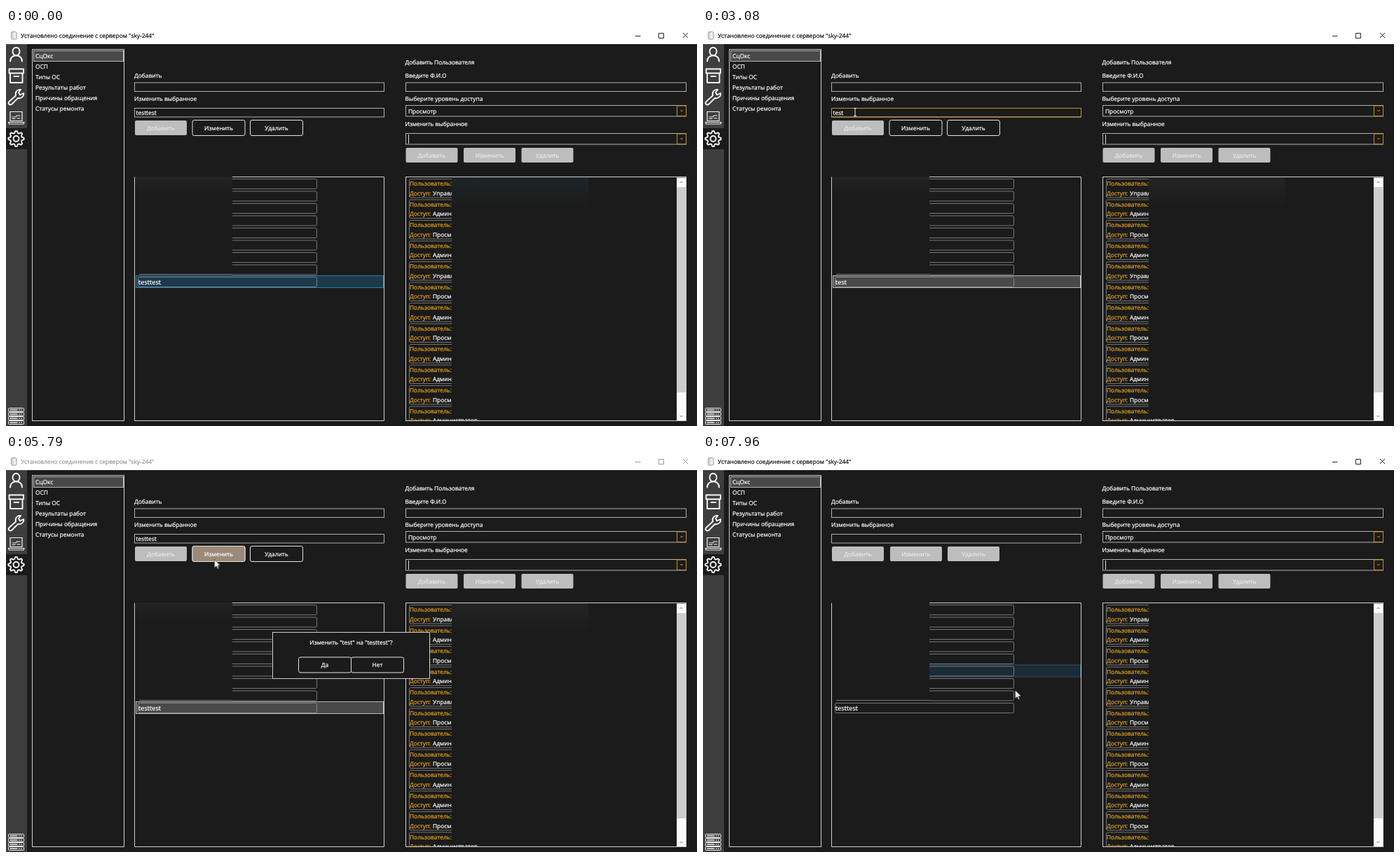
Recreate the animation shown at these times as an HTML page. Size 986 px wide and 568 px high, loop 8000 ms.

```html
<!DOCTYPE html>
<html lang="ru">
<head>
<meta charset="utf-8">
<title>Настройки</title>
<style>
html, body { margin: 0; width: 100%; height: 100%; overflow: hidden; background: #1b1b1b; }
svg { display: block; width: 986px; height: 568px; }
text { font: 8.4px "Open Sans", "Noto Sans", sans-serif; fill: #fff; stroke: #fff; stroke-width: .22; text-rendering: geometricPrecision; white-space: pre; }
.dark { fill: #111; stroke: #111; }
.faded { fill: #999; stroke: #999; }
.gold { fill: #e3a01e; stroke: #e3a01e; }
.big { font-size: 9.2px; }
.off { fill: #e8e8e8; stroke: #e8e8e8; }
.mid { text-anchor: middle; }
.icon { fill: none; stroke: #f8f8f8; stroke-width: 1.9; stroke-linejoin: round; stroke-linecap: round; }
.icon .thin { stroke-width: 1.2; }
</style>
</head>
<body>
<script>
const LOOP = 8000, BG = '#1b1b1b', LINE = '#cfcfcf', INPUT = '#b0b0b0', GOLD = '#c8901e';
// Moments of the story, in ms
const START = 40, PICK = 1300, FOCUS = 2450, ASK = 5600, CLOSE = 7400;
let css = '', count = 0;

const animate = (frames, ease) => {
  const id = 'k' + count++;
  css += `@keyframes ${id}{${frames.map(([t, s]) => `${t / LOOP * 100}%{${s}}`).join('')}}`;
  return `style="animation:${id} ${LOOP}ms ${ease} infinite"`;
};
const during = (from, to, body) => {
  const frames = [[0, `opacity:${from ? 0 : 1}`]];
  if (from) frames.push([from, 'opacity:1']);
  frames.push([to, `opacity:${to < LOOP ? 0 : 1}`]);
  if (to < LOOP) frames.push([LOOP, 'opacity:0']);
  return `<g ${animate(frames, 'step-end')}>${body}</g>`;
};
const fade = (points, body) =>
  `<g ${animate(points.map(([t, o]) => [t, `opacity:${o}`]), 'linear')}>${body}</g>`;

const rect = (x, y, x2, y2, fill = 'none', stroke = 'none', r = 0) =>
  `<rect x="${x}" y="${y}" width="${x2 - x}" height="${y2 - y}" rx="${r}" fill="${fill}" stroke="${stroke}"/>`;
const path = (d, stroke, width = 1, fill = 'none') =>
  `<path d="${d}" stroke="${stroke}" stroke-width="${width}" fill="${fill}"/>`;
// y is the middle of the capitals
const text = (x, y, s, cls = '') => `<text x="${x}" y="${y + 3}" class="${cls}">${s}</text>`;
const button = (x, y, label, fill = BG) =>
  rect(x, y, x + 75, y + 22, fill, '#e4e4e4', 2.5) + text(x + 37.5, y + 11.3, label, 'mid');
const disabled = (x, y, label) =>
  rect(x, y, x + 74, y + 21, '#bdbdbd', 'none', 2) + text(x + 37, y + 11, label, 'mid off');
const chevron = (x, y, dir, color) => path(`M${x - 2} ${y - dir}l2 ${2 * dir} 2 ${-2 * dir}`, color);

function titleBar() {
  const controls = (color, cls) =>
    text(21, 10.8, 'Установлено соединение с сервером "sky-244"', cls) +
    path('M898 11.5h7.5M931.5 7.5h7v7h-7zM966 7l7 7M973 7l-7 7', color);
  return rect(0, 0, 986, 23, '#fff') +
    rect(7.5, 5.5, 15, 16, '#eee', '#999', 1.5) + path('M9.5 6v10', '#bbb') +
    during(0, ASK, controls('#222', 'dark')) +
    during(ASK, CLOSE, controls('#999', 'faded')) +
    during(CLOSE, LOOP, controls('#222', 'dark'));
}

function sideBar() {
  const gear = Array.from({ length: 32 }, (_, i) => {
    const a = (i - 1.5) * Math.PI / 16, r = i % 4 === 1 || i % 4 === 2 ? 11.2 : 8.4;
    return `${(14.5 + r * Math.sin(a)).toFixed(1)},${(158 - r * Math.cos(a)).toFixed(1)}`;
  }).join(' ');
  const server = [542.5, 548.5, 554.5, 560.5].map(y =>
    rect(3.5, y, 25.5, y + 5, 'none', '#f4f4f4', 1) +
    path(`M5.500 ${y + 2.5}h11M18.500 ${y + 2.5}h1.500M21.500 ${y + 2.5}h1.500`, '#f4f4f4', 1.4)).join('');
  return rect(0, 23, 30, 568, '#3e3e3e') + rect(0, 143, 30, 173, BG) +
    `<g class="icon">
      <ellipse cx="14.5" cy="33.5" rx="5" ry="5.8"/><path d="M6 47.5c0-11 17-11 17 0"/>
      <path d="M4.5 58.5h20.5v6h-20.5zM6 64.5v13.5h17.5v-13.5M11.5 69h6.5"/>
      <path d="M4.5 105 14 96.5C12.5 92 16 87 21 88L18 92l2 3.5 5-2.5C26 97 22 101 17 100L8.5 108.5C5.5 111 2 108 4.5 105Z"/>
      <path class="thin" d="M6 119.5h17v13h-17zM3.5 134.5h22.5l-1 2.5h-20.5zM9 127h5l1.5-2h4.5M9 129.5h4M16 129h4"/>
      <polygon points="${gear}"/><circle cx="14.5" cy="158" r="4"/>
    </g>` + server;
}

function menu() {
  const names = ['СцОкс', 'ОСП', 'Типы ОС', 'Результаты работ', 'Причины обращения', 'Статусы ремонта'];
  return rect(37.5, 30.5, 168.5, 560.5, 'none', LINE) +
    rect(39.5, 32.5, 167.5, 47.5, '#494949', '#b8b8b8') +
    names.map((s, i) => text(42, 40.4 + 15 * i, s)).join('');
}

function editor() {
  const steps = [
    [0, 'testtest'], [START, 'Главный офис'], [PICK, 'test'],
    [3600, 'testt'], [3800, 'testte'], [4000, 'testtes'], [4200, 'testtest'], [CLOSE, '']
  ];
  const field = steps.map(([t, s], i) =>
    s && during(t, steps[i + 1][0], text(185.5, 121.3, s))).join('');
  return text(183, 68.3, 'Добавить') + rect(183.5, 78, 539.5, 90.5, 'none', INPUT) +
    text(183, 101.3, 'Изменить выбранное') + rect(183.5, 114.5, 539.5, 127, 'none', INPUT) +
    during(FOCUS, ASK, rect(183.5, 114.5, 539.5, 127, 'none', GOLD)) + field +
    disabled(184, 132, 'Добавить') +
    during(0, CLOSE, button(266, 131.5, 'Изменить') + button(348.5, 131.5, 'Удалить')) +
    fade([[0, 0], [4850, 0], [5000, 1], [5900, 1], [6050, 0], [LOOP, 0]], button(266, 131.5, 'Изменить', '#9c8a78')) +
    during(CLOSE, LOOP, disabled(267, 132, 'Изменить') + disabled(349, 132, 'Удалить'));
}

function places() {
  const top = i => 215.5 + 17.5 * i;
  const mark = (i, fill, stroke) => rect(185.5, top(i) - 2, 538.5, top(i) + 15, fill, stroke);
  const blue = i => mark(i, '#1e3a4a', '#2a7da8');
  const cell = i => rect(188.5, top(i), 443.5, top(i) + 14, 'none', '#a8a8a8a8', 2);
  const label = s => text(189, 362.7, s, 'big');
  let cells = '';
  for (let i = 0; i < 8; i++) cells += cell(i);
  return path('M323 212.5H539.5V560.5H183.5V212.5', LINE) +
    `<g clip-path="url(#shown)">` + during(START, PICK, blue(0)) +
    during(CLOSE, LOOP, mark(5, '#1c2c37', '#27536c')) + cells + '</g>' +
    path('M190 351.5H323', '#7c7c7c') +
    during(0, START, blue(8)) + during(800, FOCUS, blue(8)) +
    during(FOCUS, CLOSE, mark(8, '#494949', '#b8b8b8')) + cell(8) +
    during(0, START, label('testtest')) + during(START, ASK, label('test')) +
    during(ASK, LOOP, label('testtest')) +
    during(0, CLOSE, rect(185, 212, 323, 236, 'url(#haze)'));
}

function combo(y, value) {
  return rect(570.5, y, 970.5, y + 15.5, 'none', INPUT) +
    rect(957.5, y + .5, 970.5, y + 15, BG, GOLD) + chevron(964, y + 7.5, 1, GOLD) + value;
}

function users() {
  const access = 'УАПАУПАПААПА', words = { У: 'Управление', А: 'Администратор', П: 'Просмотр' };
  const cards = [...access].map((c, i) => {
    const y = 215.5 + 29.5 * i;
    return rect(575.5, y, 760, y + 26.5, 'none', '#747474', 2) +
      text(576, y + 6.7, 'Пользователь:', 'gold') + text(576, y + 20.3, 'Доступ:', 'gold') +
      text(609, y + 20.3, words[c]);
  }).join('');
  return text(569.5, 48.7, 'Добавить Пользователя') + text(569.5, 68.3, 'Введите Ф.И.О') +
    rect(570.5, 78, 970.5, 90.5, 'none', INPUT) + text(569.5, 101.3, 'Выберите уровень доступа') +
    combo(110.5, text(574, 119.3, 'Просмотр')) + text(569.5, 137.3, 'Изменить выбранное') +
    combo(150.5, path('M574.5 152v13', '#ddd')) +
    ['Добавить', 'Изменить', 'Удалить'].map((s, i) => disabled(570.5 + 82.5 * i, 171, s)).join('') +
    `<g clip-path="url(#cards)">${cards}</g>` +
    during(0, PICK, rect(636, 213, 831, 256, 'url(#teal)')) +
    during(PICK, CLOSE, rect(636, 213, 831, 256, 'url(#haze)')) +
    rect(570.5, 212.5, 970.5, 560.5, 'none', LINE) +
    rect(957, 213.5, 970, 560, '#fafafa') + rect(957, 227, 970, 520, '#cdcdcd') +
    chevron(963.5, 220, -1, '#777') + chevron(963.5, 554, 1, '#777');
}

function dialog() {
  return during(ASK, CLOSE, rect(380.5, 254.5, 604.5, 320.5, BG, LINE) +
    text(492.5, 269.2, 'Изменить "test" на "testtest"?', 'mid') +
    button(417.5, 290, 'Да') + button(492.5, 290, 'Нет') +
    fade([[0, 0], [6850, 0], [7000, 1], [CLOSE, 1], [LOOP, 0]], button(417.5, 290, 'Да', '#505050')));
}

function pointer() {
  const stops = [
    [0, 300, 240], [300, 300, 240], [850, 274.5, 361.5], [1700, 274.5, 361.5],
    [2350, 217, 120], [4300, 217, 120], [4950, 286.5, 142], [5300, 286.5, 142],
    [5600, 297.5, 150.5], [6300, 297.5, 150.5], [6700, 452, 256], [7000, 453.5, 297.5],
    [7420, 453.5, 297.5], [7900, 445.5, 337], [LOOP, 445.5, 337]
  ];
  const move = animate(stops.map(([t, x, y]) => [t, `transform:translate(${x}px,${y}px)`]), 'ease-in-out');
  const arrow = path('M0 0V12L2.8 9.4 4.6 13.5 6.4 12.7 4.7 8.8H8.4Z', '#111', .6, '#fff');
  const beam = path('M-2 -5.5h4M0 -5.5v11M-2 5.5h4', '#eee');
  return `<g ${move}>${during(START, 2300, arrow)}${during(2300, 4400, beam)}${during(4400, LOOP, arrow)}</g>`;
}

const gradient = (id, color) =>
  `<linearGradient id="${id}" x2="0" y2="1"><stop stop-color="${color}"/><stop offset="1" stop-color="${BG}"/></linearGradient>`;
const scene = `<defs>${gradient('haze', '#242424')}${gradient('teal', '#1d2529')}
  <clipPath id="shown"><path d="M323 212h217v349h-217z"/></clipPath>
  <clipPath id="cards"><path d="M571 213h65v344h38v3.3h-103z"/></clipPath></defs>` +
  rect(0, 0, 986, 568, BG) + titleBar() + sideBar() + menu() + editor() + places() + users() + dialog() + pointer();

document.head.insertAdjacentHTML('beforeend', `<style>${css}</style>`);
document.body.innerHTML = `<svg viewBox="0 0 986 568">${scene}</svg>`;
</script>
</body>
</html>
```
